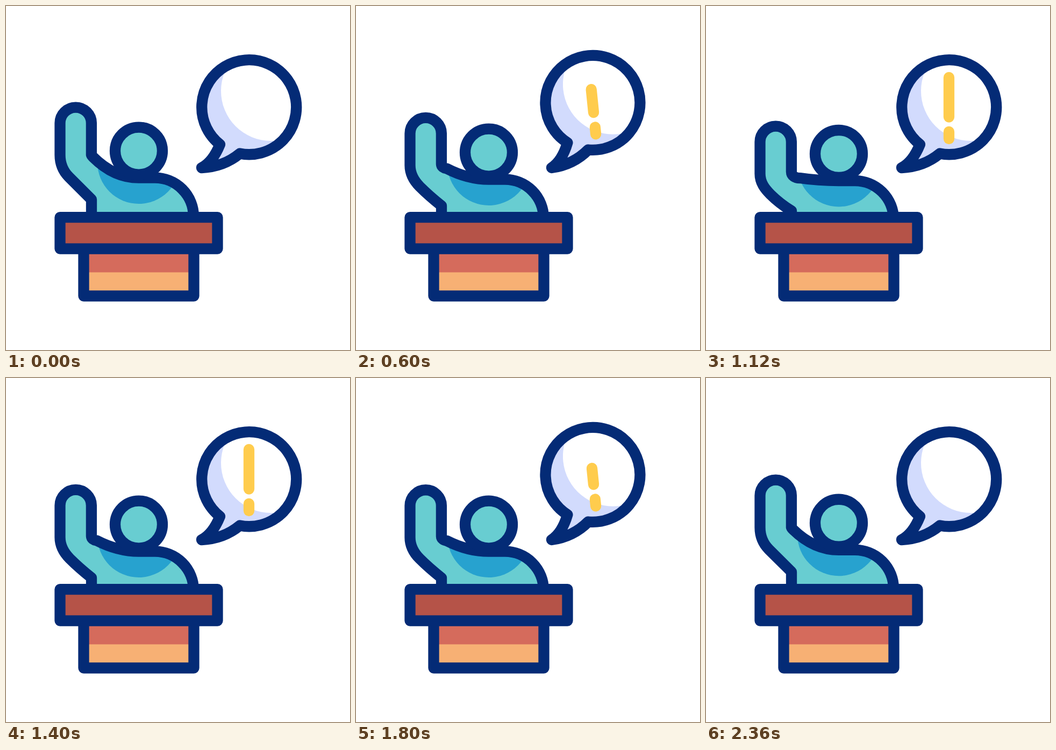
These frames come from a looping animation (640x640 px, 2.4 s). An HTML page:

```html
<!DOCTYPE html>
<html lang="en">
<head>
<meta charset="utf-8">
<style>
  html, body { margin: 0; width: 100%; height: 100%; overflow: hidden; background: #fff; }
  svg { display: block; width: 100%; height: 100%; }
  .line { fill: none; stroke: #042b76; stroke-width: 20.3; stroke-linecap: round; stroke-linejoin: round; }
  .bang { fill: none; stroke: #ffcc4d; stroke-width: 20.3; stroke-linecap: round; }
</style>
</head>
<body>
<svg viewBox="0 0 640 640">
  <defs>
    <clipPath id="bodyClip"><path class="body"/></clipPath>
    <clipPath id="bubbleClip"><path class="balloon"/></clipPath>
  </defs>

  <path class="body" fill="#68cdd1"/>
  <g clip-path="url(#bodyClip)"><circle id="shade" cx="247" cy="291" r="77" fill="#27a2cf"/></g>
  <path class="body line"/>
  <circle id="head" class="line" cx="247" cy="269.6" r="44" style="fill:#68cdd1"/>

  <path fill="#d56b5c" d="M144.5 452h205v44h-205z"/>
  <path fill="#f7b074" d="M144.5 495.5h205v44h-205z"/>
  <path class="line" d="M144.5 452v87.5h205V452"/>
  <path class="line" style="fill:#b55348" d="M100.5 393.2h293v58.4h-293z"/>

  <g id="bubble">
    <path class="balloon" fill="#d2dbfd"/>
    <g clip-path="url(#bubbleClip)"><circle cx="493" cy="158" r="93" fill="#fff"/></g>
    <path class="balloon line"/>
    <path id="bar" class="bang"/>
    <path id="dot" class="bang"/>
  </g>
</svg>
<script>
const LOOP = 2400;
const $ = id => document.getElementById(id);
const setPath = (name, d) =>
  document.querySelectorAll('.' + name).forEach(el => el.setAttribute('d', d));

// Eased progress from time a to time b
const ease = (t, a, b) => {
  const u = Math.min(1, Math.max(0, (t - a) / (b - a)));
  return u * u * (3 - 2 * u);
};

// Eased value through [time, value] keys
const track = (keys, t) => keys.slice(1).reduce(
  (v, [time, value], i) => v + (value - keys[i][1]) * ease(t, keys[i][0], time), keys[0][1]);

const swing = [[240, 0], [380, 10], [520, -10], [745, 4.3], [900, -1.2], [1040, 0]];

// Speaker outline; p = 0 arm raised, p = 1 arm lowered
function bodyPath(p) {
  const pt = (x, y, dx, dy) => `${x + dx * p} ${y + dy * p} `;
  return 'M159 400L' + pt(159, 360, 0, 23.5) +
    'C' + pt(145, 346, 1, 30) + pt(131, 332, 3, 36) + pt(117, 318, 3, 36) +
    'C' + pt(107, 308, 3, 36) + pt(100.5, 294, 0, 39) + pt(100.5, 277, 0, 39) +
    'L' + pt(100.5, 217.8, 0, 39) + 'A29.2 29.2 0 0 1 ' + pt(158.9, 217.8, 0, 39) +
    'L' + pt(158.9, 277, 0, 35) +
    'C' + pt(159, 278, 0, 42) + pt(160, 279, 6, 45.5) + pt(162, 281, 14, 43.5) +
    'C' + pt(184, 303, 16, 23) + pt(212, 319.7, 10, 6) + pt(247, 319.7, 0, 6) +
    'L' + pt(277, 319.7, 0, 6) + 'A72 72 0 0 1 ' + pt(349, 391.7, 0, 6) + 'V400';
}

// Stroke growing upwards from its foot
function grow(el, foot, length, amount) {
  el.setAttribute('d', `M452 ${foot}V${foot - length * amount}`);
  el.style.display = amount > 0 ? '' : 'none';
}

setPath('balloon', 'M398 257.5A88 88 0 1 1 435 274.5C415 291 390 300 364 301' +
  'C381 292 391 275 398 257.5Z');

function draw() {
  const t = performance.now() % LOOP;

  const half = t % 800;
  const p = ease(half, 0, 400) - ease(half, 400, 800);
  setPath('body', bodyPath(p));
  for (const id of ['head', 'shade']) $(id).setAttribute('transform', `translate(0 ${6 * p})`);

  $('bubble').setAttribute('transform', `rotate(${track(swing, t % 1200)} 364 301)`);
  grow($('bar'), 206.5, 73.5, ease(t, 400, 760) - ease(t, 1600, 1960));
  grow($('dot'), 247, 13, ease(t, 280, 400) - ease(t, 1960, 2080));

  requestAnimationFrame(draw);
}
draw();
</script>
</body>
</html>
```
